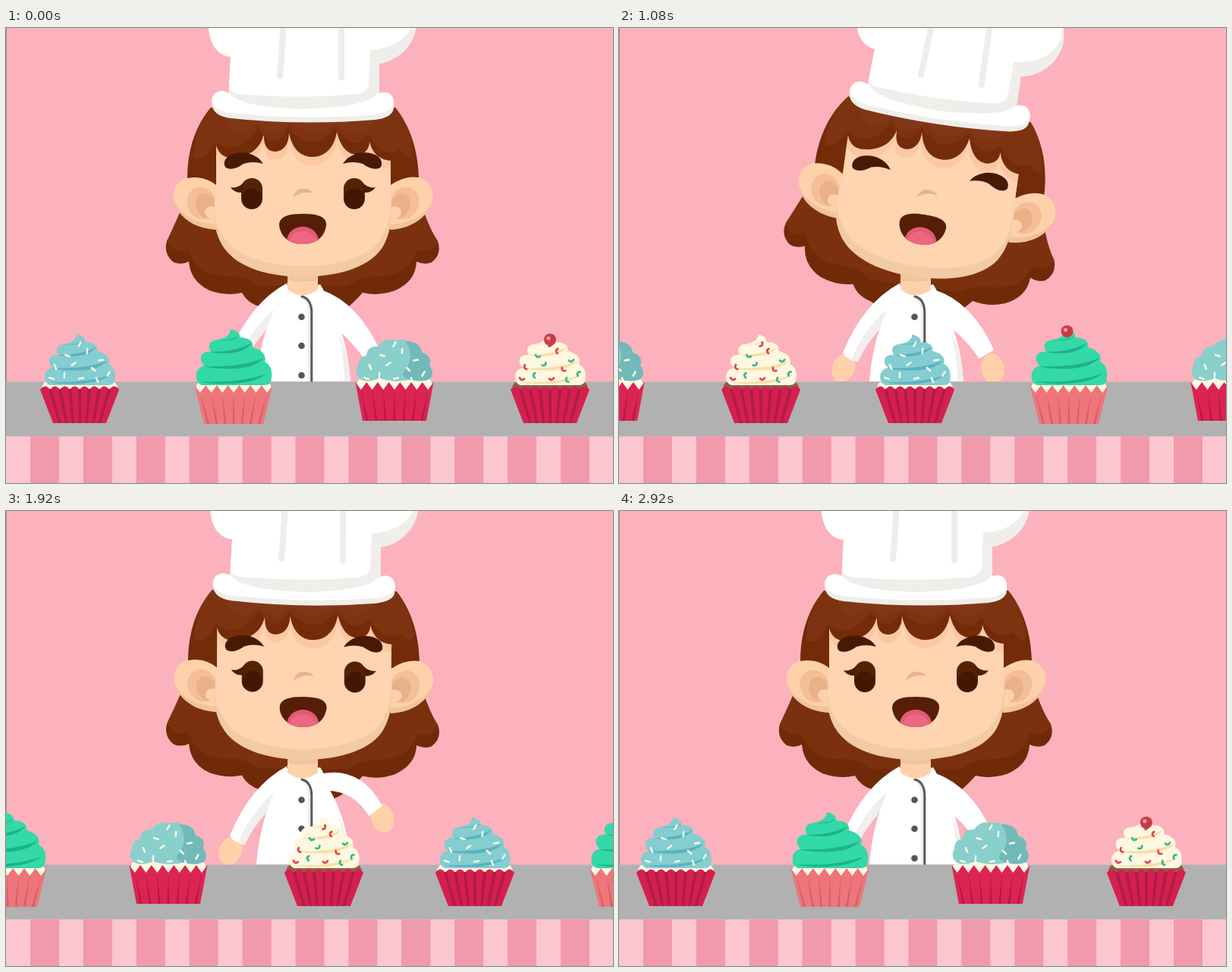
These frames come from a looping animation (800 by 600 pixels, 2960 ms). An HTML page:

```html
<!DOCTYPE html>
<html lang="en">
<head>
<meta charset="utf-8">
<title>Cupcake baker</title>
<style>
html, body { margin: 0; width: 100%; height: 100%; overflow: hidden; background: #fbb2bd; }
svg { display: block; width: 800px; height: 600px; }
</style>
</head>
<body>
<svg id="stage" viewBox="0 0 800 600" xmlns="http://www.w3.org/2000/svg"></svg>
<script>
const LOOP = 2960, STEP = 40, BEAT = 1500;
const stage = document.getElementById('stage');

const path = (d, fill, extra = '') => `<path d="${d}" fill="${fill}" ${extra}/>`;
const line = (d, color, w) => path(d, 'none', `stroke="${color}" stroke-width="${w}" stroke-linecap="round"`);
const oval = (x, y, rx, ry, fill, turn = 0) =>
  `<ellipse cx="${x}" cy="${y}" rx="${rx}" ry="${ry}" fill="${fill}" transform="rotate(${turn} ${x} ${y})"/>`;
const mirror = s => s + `<g transform="matrix(-1 0 0 1 783 0)">${s}</g>`;
const group = (id, s) => `<g id="${id}">${s}</g>`;

// ---- Cupcakes, drawn around x = 0 ----
function wrapper(n, top, bottom, half, foot, color, dark, zigzag) {
  const at = (i, w) => -w + 2 * w * i / n;
  let d = `M${-half} ${top}`, folds = '';
  for (let i = 0; i < n; i++) {
    const mid = at(i + .5, half), end = at(i + 1, half);
    d += zigzag ? `L${mid} ${top + 10}L${end} ${top}` : `Q${mid} ${top - 9} ${end} ${top}`;
    const k = zigzag ? i + .5 : i, x = at(k, half), b = at(k, foot);
    if (zigzag) folds += path(`M${x} ${top + 10}L${b + 1.5} ${bottom}H${b - 1.5}Z`, dark);
    else if (k) folds += path(`M${x - 2} ${top - 1}L${x + 2} ${top - 1}L${b + 2} ${bottom}H${b - 1.5}Z`, dark);
  }
  return path(d + `L${foot} ${bottom}H${-foot}Z`, color) + folds;
}

function swirl(color, dark) {
  return path('M-4 397Q9 400 8 408Q27 409 25 421Q45 427 41 440Q52 446 50 461Q50 471 40 471H-42' +
      'Q-51 468 -49 455Q-46 446 -38 446Q-46 439 -42 431Q-38 426 -30 427Q-36 416 -26 412Q-4 409 -4 397Z', color) +
    path('M-30 427Q4 427 24 415Q14 429 -12 429Q-24 429 -30 427Z', dark) +
    path('M-40 446Q10 448 40 435Q26 450 -8 449.500Q-30 449 -40 446Z', dark) +
    path('M-23 411Q0 412 8 406Q2 414 -23 411Z', dark) +
    path('M-44 466Q6 469 44 456Q28 468 -4 469Q-32 470 -44 466Z', dark);
}
const small = s => `<g transform="translate(0 471) scale(.93 .905) translate(0 -471)">${s}</g>`;

const SPOTS = [0, 417, -16, 432, 10, 426, 28, 438, -32, 447, -8, 443, 18, 450, 38, 456, -37, 462, -20, 458, 2, 462, 23, 464];
function sprinkles(colors, w, bend) {
  let s = '';
  for (let i = 0; i < SPOTS.length / 2; i++)
    s += `<g transform="translate(${SPOTS[2 * i]} ${SPOTS[2 * i + 1]}) rotate(${i * 77 % 180 - 60})">` +
      line(`M-3 0Q0 ${bend} 3 0`, colors[i % colors.length], w) + '</g>';
  return s;
}

const rim = (color, y = 466) => path(`M-50 ${y + 10}Q-49 ${y - 2} -38 ${y}H38Q49 ${y - 2} 50 ${y + 10}L44 ${y + 20}H-44Z`, color);
const RED = '#d5204f', WINE = '#b01c47', MILK = '#fffae3';
const cherry = y => `<g class="cherry">${oval(0, y, 8, 8, '#c63d48')}${oval(-2, y - 2, 2.6, 2.6, '#ee9a98')}</g>`;
const scallops = wrapper(8, 477, 521, 52, 35, RED, WINE, false);

const KINDS = {
  swirl: rim(MILK) + small(swirl('#84cdd0', '#58b2bf')) + sprinkles([MILK], 2.4, 0) + scallops,
  mint: rim(MILK) + swirl('#33d9a6', '#1db28b') + wrapper(7, 471, 522, 51.5, 39, '#ee757a', '#d65d69', true) + cherry(400),
  puff: rim(MILK, 462) +
    path('M-44 464Q-54 456 -48 446Q-48 434 -37 432Q-36 419 -22 420Q-12 407 2 412Q14 408 21 417Q34 415 36 428Q50 432 46 445Q54 456 46 463Q36 468 24 463Q0 469 -20 462Q-34 468 -44 464Z', '#89cfcc') +
    path('M14 413Q34 413 36 428Q50 432 46 445Q54 456 46 463Q30 469 14 461Q7 457 17 447Q26 430 14 413Z', '#72b9ba') +
    sprinkles([MILK], 2.4, 0) + wrapper(7, 467, 518, 51.5, 42, '#dc2452', '#b01b46', true),
  cream: rim('#8d5f43') + small(swirl('#fff7df', '#f6dfab')) + sprinkles(['#dc4653', '#33b893'], 2.8, 4) + scallops + cherry(411)
};
const ROW = [['swirl', 97], ['mint', 300], ['puff', 512], ['cream', 717]];

// ---- Head ----
const fringe = 'C281 168 290 172 301 171C323 169 337 157 340 138C339 155 344 163 355 163C367 162 373 152 373 138' +
  'C377 160 389 170 404 170C421 170 433 157 436 137C441 157 450 167 463 167C474 166 479 159 479 150C483 166 493 174 507 175';
const face = 'M277 140V215C273 245 272 268 288 291C308 318 350 328 391 328C432 328 476 318 495 291C508 271 510 245 507 215V140Z';

const backHair =
  path('M262 180L228 246Q220 268 212 281Q207 298 221 309Q231 313 241 308Q243 334 268 346Q290 354 311 349' +
    'Q318 363 336 368Q391 392 432 379Q448 374 470 349Q493 354 513 346Q540 334 541 308Q552 313 561 309Q575 298 569 281Q560 268 552 246L520 180Z', '#702a08') +
  path('M262 180L228 246Q218 268 212 281Q218 298 240 293Q252 328 292 327Q318 327 332 340H450Q470 327 490 327Q530 328 542 293' +
    'Q563 298 569 281Q560 268 552 246L520 180Z', '#7b310d');

const earShape = 'M284 212Q264 194 245 196C228 198 219 211 221 226C225 249 249 265 277 266Z';
const ear = path(earShape, '#f0c39b') +
  path('M284 212Q264 194 245 196C228 198 219 211 221 226C227 246 251 258 277 259Z', '#ffd1aa') +
  oval(258, 231, 19, 22, '#f3bf98', -25) + oval(264, 235, 13, 17, '#eab088', -25) + oval(271, 243, 9, 8, '#ffd1aa');

const brow = path('M288 181C286 168 303 162 319 165Q333 169 339 179Q325 175 313 179Q302 187 294 185.500Q289 185 288 181Z', '#481a05');
const eye = '<rect x="310" y="198" width="28" height="41" rx="14" fill="#552205"/>' +
  oval(324, 225, 13, 13.5, '#421703') +
  path('M296 210Q305 212 313 204L312 217Q301 218 296 210Z', '#4c1c05');

const hat =
  path('M292 110L296 38C278 36 267 20 267 -4C267 -45 300 -70 340 -70H490C520 -70 542 -38 541 -4C539 22 518 43 492 47V110Z', '#f0eeeb') +
  path('M294 80L296 38C278 36 267 20 267 -4C267 -45 300 -70 340 -70H490C520 -70 540 -38 537 -8C530 15 508 27 480 29L478 76Q476 85 462 87Q390 94 306 87Q298 86 294 80Z', '#fff') +
  line('M367 -45Q365 20 361 63', '#f0ece8', 8) + line('M442 -45V65', '#f0ece8', 8) +
  path('M271 98C271 84 284 79 296 87Q308 104 391 107Q476 104 489 87C505 80 512 90 511 104C511 114 502 119 487 121Q390 129 296 119C280 117 271 110 271 98Z', '#efeeeb') +
  path('M271 97C271 84 284 79 296 87Q308 104 391 107Q476 104 489 87C505 80 512 90 511 101Q508 111 487 114Q390 122 296 112Q275 109 271 97Z', '#fff');

const head = mirror(ear) + path(face, '#f2caa4') +
  path('M277 140V215C273 243 274 258 290 280C309 304 350 314 391 314C432 314 474 304 493 280C506 258 509 243 507 215V140Z', '#ffd4b1') +
  `<clipPath id="skin">${path(face, '#000')}</clipPath><g clip-path="url(#skin)"><g transform="translate(0 11)">` +
  path(`M277 155${fringe}V110H277Z`, '#fac9a4') + '</g></g>' +
  path(`M270 105C250 128 239 160 239 198Q260 194 277 207V155${fringe}V207Q526 194 544 197C543 160 532 128 513 105Z`, '#742b08') +
  path('M270 105C254 125 247 148 247 170Q260 180 276 150Q304 172 332 132Q354 166 372 132Q404 168 434 132Q460 166 478 140Q496 174 519 160Q536 180 536 160Q530 125 513 105Z', '#7d330f') +
  path('M288 118Q300 154 330 126Q356 150 376 124Q404 154 432 126Q466 154 490 118Z', '#84391a', 'opacity=".7"') +
  group('brows', mirror(brow)) + group('eyes', mirror(eye)) +
  path('M378 224Q382 210 394 212Q402 213 405 218Q390 214 378 224Z', '#ebb38b') +
  '<clipPath id="lips"><path d="M360 260C360 249 371 245 391 245C411 245 423 249 422 260C420 276 408 285 391 285C374 285 362 276 360 260Z"/></clipPath>' +
  `<g clip-path="url(#lips)"><path d="M355 240H427V290H355Z" fill="#561e06"/>${oval(391, 281, 21, 19, '#e25a76')}${oval(391, 284, 18, 16, '#ec6782')}</g>` +
  hat;

// ---- Body ----
const body =
  oval(296, 448, 15, 19, '#ffd1aa', 25) +
  path('M371 336Q322 362 295 428Q300 438 315 440Q325 412 348 392Z', '#fff') +
  path('M366 362Q328 386 306 437L315 440Q325 418 340 402Z', '#f1efed') +
  path('M368 338Q391 346 414 338Q420 346 425 365Q450 405 454 466H330Q334 415 352 375Q360 350 368 338Z', '#fff') +
  path('M437 398Q452 430 454 466H446Q445 425 437 398Z', '#f1efed') +
  line('M390 355Q399 358 400 375V470', '#f0eeec', 4) +
  line('M390 354Q402 357 402.800 374V470', '#5a5a58', 3) +
  [381, 419, 458].map(y => oval(389.5, y, 4.3, 4.3, '#555553')).join('') +
  path('M371 315H411V345Q391 360 371 345Z', '#ffd1aa') + path('M371 315H411V332Q391 337 371 332Z', '#eec49d');

// Six sleeve points, then hand centre and hand tilt
const POSES = [
  [415, 345, 465, 362, 494, 428, 474, 439, 450, 404, 420, 386, 492, 454, -5],
  [415, 345, 468, 350, 496, 402, 479, 414, 458, 380, 424, 371, 497, 416, -25],
  [416, 350, 464, 305, 496, 360, 477, 377, 460, 348, 424, 364, 494, 380, -10]
];

// ---- Counter ----
let stripes = '';
for (let x = 32; x < 800; x += 69.9) stripes += `<rect x="${x}" y="538.5" width="38" height="62" fill="#f09aab"/>`;
let cakes = '';
for (const lap of [0, 1])
  for (const [kind] of ROW) cakes += group(kind + lap, KINDS[kind]);

stage.innerHTML =
  '<rect width="800" height="600" fill="#fbb2bd"/><rect width="1" height="490" fill="#a98a91"/>' +
  group('hair', backHair) + body +
  '<ellipse id="hand" rx="15" ry="20" fill="#ffd1aa"/><path id="sleeve" fill="#fff"/>' +
  group('head', head) +
  '<rect y="466.5" width="800" height="73" fill="#b1b1b1"/><rect y="538.5" width="800" height="62" fill="#fbc6cf"/>' +
  stripes + cakes;

const $ = id => document.getElementById(id);
const ease = k => { k = Math.min(1, Math.max(0, k)); return k * k * (3 - 2 * k); };

function drawArm(u) {
  const low = u < .6, k = low ? u / .6 : (u - .6) / .4;
  const a = POSES[low ? 0 : 1], b = POSES[low ? 1 : 2];
  const p = a.map((v, i) => v + (b[i] - v) * k);
  $('sleeve').setAttribute('d', `M${p[0]} ${p[1]}Q${p.slice(2, 6)}L${p[6]} ${p[7]}Q${p.slice(8, 12)}Z`);
  $('hand').setAttribute('transform', `translate(${p[12]} ${p[13]}) rotate(${p[14]})`);
}

function drawCakes(t) {
  for (const lap of [0, 1])
    for (const [kind, x0] of ROW) {
      const x = lap ? x0 - 828 + .276 * t : x0 + .2713 * t;
      const cake = $(kind + lap), top = cake.querySelector('.cherry');
      cake.setAttribute('transform', `translate(${x.toFixed(2)} 0)`);
      if (!top) continue;
      const shown = kind === 'mint' ? !lap && t >= 740 : !lap || t >= 2240;
      const drift = kind === 'mint' ? -1 - .0044 * (t - 760) : 0;
      top.setAttribute('visibility', shown ? 'visible' : 'hidden');
      top.setAttribute('transform', `translate(${drift.toFixed(2)} 0)`);
    }
}

function draw(t) {
  const tilt = 8 * (ease(t / 580) - ease((t - 1420) / 580));
  for (const id of ['hair', 'head']) $(id).setAttribute('transform', `rotate(${tilt.toFixed(3)} 390 326)`);
  const beat = t % BEAT, smiling = beat >= 920 && beat < 1400;
  $('eyes').setAttribute('visibility', smiling ? 'hidden' : 'visible');
  $('brows').setAttribute('transform', `translate(0 ${smiling ? 14 : 0})`);
  drawArm(ease(beat / 640) - ease((beat - 780) / 360));
  drawCakes(t);
}

const start = performance.now();
function tick() {
  const t = (performance.now() - start) % LOOP;
  draw(Math.floor(t / STEP) * STEP);
  requestAnimationFrame(tick);
}
tick();
</script>
</body>
</html>
```
